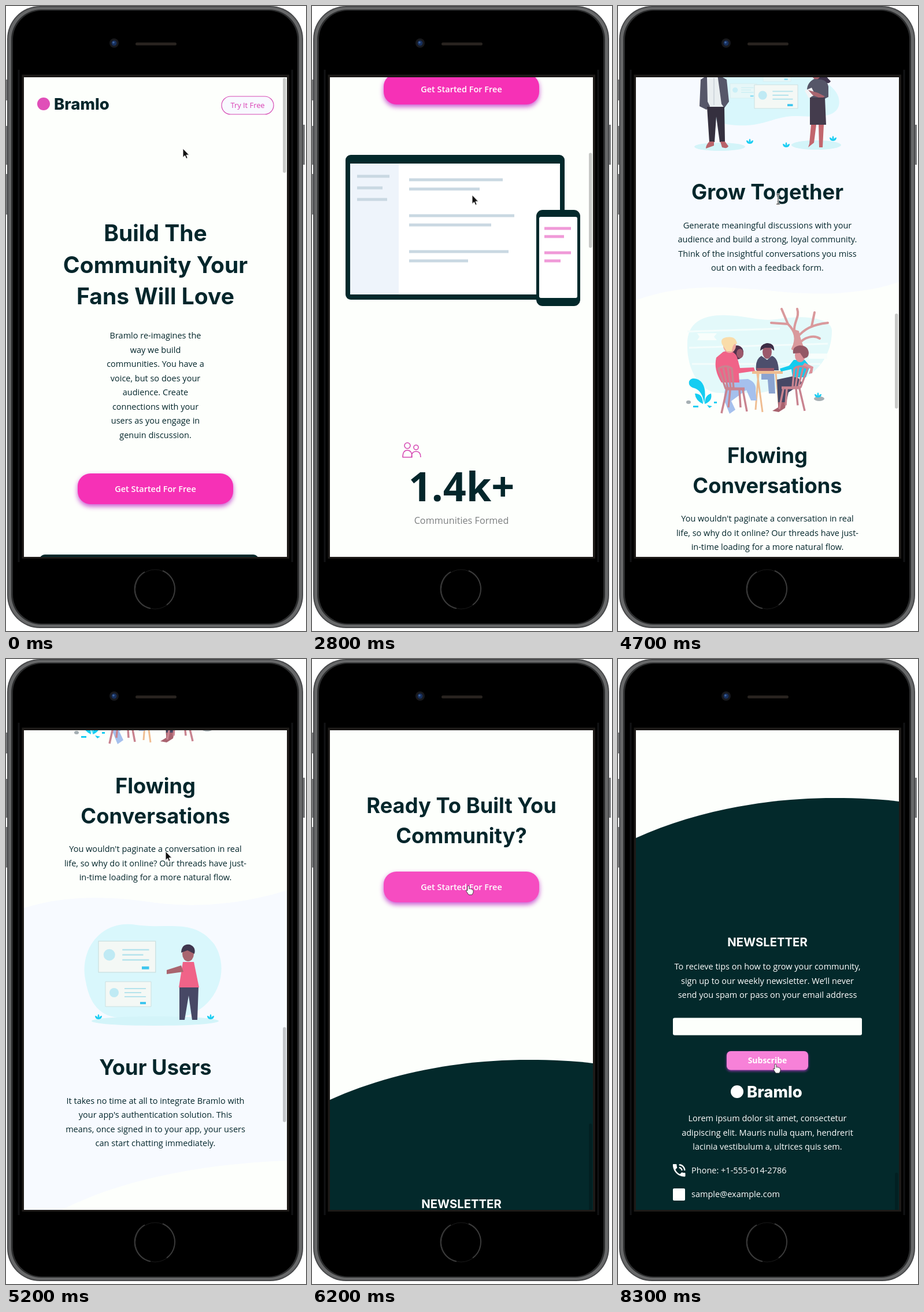
Animation of 519x1079 px, one loop 9100 ms. Source, as an HTML page:

```html
<!DOCTYPE html>
<html lang="en">
<head>
<meta charset="utf-8">
<title>Landing page on a phone</title>
<style>
  @property --scroll { syntax: "<number>"; inherits: true; initial-value: 0; }

  html, body { margin: 0; width: 100%; height: 100%; overflow: hidden; background: #fff; }
  svg { display: block; }
  #stage { animation: scroll 9.1s infinite; }
  #page { transform: translateY(calc(var(--scroll) * -1px)); }
  #thumb { transform: translateY(calc(var(--scroll) * .1876px)); }

  text { fill: #03262b; text-anchor: middle; }
  .brand, .h1, .h2, .h3 { font-family: Inter, sans-serif; font-weight: 700; }
  .brand { font-size: 27.5px; font-weight: 800; text-anchor: start; }
  .h1 { font-size: 39px; }
  .h2 { font-size: 36.3px; }
  .h3 { font-size: 20.3px; }
  .p { font: 14.5px "Open Sans", sans-serif; }
  .stat { font: 700 70px "Open Sans", sans-serif; }
  .label { font: 16.2px "Open Sans", sans-serif; fill: #7c7f80; }
  .btn { font: 600 14.5px "Open Sans", sans-serif; }
  .light text, .btn { fill: #fff; }
  .left { text-anchor: start; }
  .cta { fill: #f631b6; filter: drop-shadow(0 4px 4px rgba(185, 30, 195, .75)); }
  .line { fill: none; stroke: #d64bb4; stroke-width: 1.6; stroke-linejoin: round; }
  .tint { fill: #f7faff; }

  #try { animation: try 9.1s step-end infinite; }
  #start1 { animation: start1 9.1s infinite; }
  #start2 { animation: start2 9.1s infinite; }
  #sub { animation: sub 9.1s infinite; filter: drop-shadow(0 2px 2px rgba(200, 60, 220, .7)); }
  #cursor { animation: point 9.1s step-end infinite; }
  #arrow { animation: arrow 9.1s step-end infinite; }
  #hand { animation: hand 9.1s step-end infinite; }
  #beam { animation: beam 9.1s step-end infinite; }

  /* The screen refreshes ten times a second, hence the stepped segments. */
  @keyframes scroll {
    0% { --scroll: 0; }
    25.274% { --scroll: 0; animation-timing-function: steps(8, start); }
    34.065% { --scroll: 920; }
    37.362% { --scroll: 920; animation-timing-function: steps(5, start); }
    42.857% { --scroll: 1492; animation-timing-function: step-end; }
    43.956% { --scroll: 1495; }
    46.153% { --scroll: 1495; animation-timing-function: steps(6, start); }
    52.747% { --scroll: 2169; animation-timing-function: steps(10, start); }
    63.736% { --scroll: 3283; animation-timing-function: steps(4, start); }
    68.131% { --scroll: 3614; }
    76.923% { --scroll: 3614; animation-timing-function: steps(2, start); }
    79.120% { --scroll: 3911; animation-timing-function: steps(3, start); }
    82.417%, 100% { --scroll: 4066; }
  }
  @keyframes point {
    0% { transform: translate(306px, 246px); }
    3.296% { transform: translate(356px, 222px); }
    4.395% { transform: translate(393px, 202px); }
    6.593% { transform: translate(398px, 182px); }
    7.692% { transform: translate(402px, 174px); }
    10.989% { transform: translate(392px, 230px); }
    12.087% { transform: translate(370px, 400px); }
    13.186% { transform: translate(338px, 600px); }
    14.285% { transform: translate(312px, 740px); }
    15.384% { transform: translate(295px, 828px); }
    16.483% { transform: translate(287px, 835px); }
    18.681% { transform: translate(283px, 760px); }
    19.780% { transform: translate(281px, 540px); }
    20.879% { transform: translate(280px, 366px); }
    21.978% { transform: translate(281px, 335px); }
    23.076% { transform: translate(280px, 309px); }
    25.274% { transform: translate(280px, 309px); animation-timing-function: steps(8, start); }
    34.065% { transform: translate(276px, 332px); }
    63.736% { transform: translate(276px, 332px); animation-timing-function: steps(4, start); }
    68.131% { transform: translate(266px, 391px); }
    74.725% { transform: translate(269px, 394px); }
    76.923% { transform: translate(265px, 430px); }
    78.021% { transform: translate(264px, 453px); }
    79.120% { transform: translate(264px, 453px); animation-timing-function: steps(8, start); }
    87.912% { transform: translate(264px, 652px); animation-timing-function: steps(4, start); }
    92.307%, 100% { transform: translate(268px, 699px); }
  }
  @keyframes hand {
    0% { opacity: 0; } 6.593% { opacity: 1; } 10.989% { opacity: 0; }
    15.384% { opacity: 1; } 18.681% { opacity: 0; }
    68.131% { opacity: 1; } 76.923% { opacity: 0; } 89.010%, 100% { opacity: 1; }
  }
  @keyframes arrow {
    0% { opacity: 1; } 6.593% { opacity: 0; } 10.989% { opacity: 1; }
    15.384% { opacity: 0; } 18.681% { opacity: 1; }
    51.648% { opacity: 0; } 52.747% { opacity: 1; }
    68.131% { opacity: 0; } 76.923% { opacity: 1; } 89.010%, 100% { opacity: 0; }
  }
  @keyframes beam { 0% { opacity: 0; } 51.648% { opacity: 1; } 52.747%, 100% { opacity: 0; } }
  @keyframes try { 0% { opacity: 1; } 6.593% { opacity: .6; } 10.989%, 100% { opacity: 1; } }
  @keyframes start1 {
    0%, 14.285% { fill: #f631b6; animation-timing-function: steps(3, start); }
    17.582% { fill: #f781d8; animation-timing-function: steps(2, start); }
    19.780%, 100% { fill: #f631b6; }
  }
  @keyframes start2 {
    0%, 68.131% { fill: #f631b6; animation-timing-function: steps(3, start); }
    71.428%, 76.923% { fill: #f781d8; animation-timing-function: steps(2, start); }
    79.120%, 100% { fill: #f631b6; }
  }
  @keyframes sub {
    0%, 89.010% { fill: #f631b6; animation-timing-function: steps(3, start); }
    92.307%, 100% { fill: #f781d8; }
  }
</style>
</head>
<body>
<svg id="stage" width="519" height="1079" viewBox="0 0 519 1079">
  <defs>
    <clipPath id="screen"><path d="M31 123H486V951H31Z"/></clipPath>
    <g id="card">
      <path d="M0 0H79V43H0Z" fill="#f4f8f5" stroke="#cbdfe0"/>
      <circle cx="15" cy="19" r="8" fill="#bfeaf4"/>
      <path d="M33 12H70M33 19H62M33 26H70" stroke="#b5e3ec" stroke-width="2"/>
      <path d="M60 35H70V39H60Z" fill="#3fc6ee"/>
    </g>
    <path id="sprig" d="M0 5C-4 5-6 2-6-1C-3-1-2 1-1 2C-2-1-1-3 0-4C1-3 2-1 1 2C2 1 3-1 6-1C6 2 4 5 0 5Z" fill="#1bcdf2"/>
    <g id="chair" fill="none" stroke="#c98490" stroke-width="3.5" stroke-linejoin="round">
      <path d="M2 5Q15-3 25 5L28 39H14ZM10 4L18 39M18 3L23 39"/>
      <path d="M14 40H47" stroke-width="5"/>
      <path d="M16 42L7 82M44 42L51 79M22 42L19 72M38 42L40 72"/>
    </g>
  </defs>

  <!-- Phone body -->
  <path d="M0 127H5V163H0ZM0 207H5V274H0ZM0 290H5V360H0ZM512 205H517V274H512Z" fill="#77787a"/>
  <rect x="2" width="512" height="1074" rx="57" fill="#47484a"/>
  <rect x="4" y="2" width="508" height="1070" rx="55" fill="#676869"/>
  <rect x="9" y="6" width="498" height="1062" rx="52" fill="#2c2d2e"/>
  <rect x="12" y="8" width="492" height="1058" rx="50"/>
  <path d="M22 110V960M495 110V960" stroke="#121315" stroke-width="3"/>
  <circle cx="187" cy="64" r="8" fill="#18191d"/>
  <circle cx="187" cy="64" r="4.5" fill="#172f5c"/>
  <circle cx="186" cy="63" r="1.8" fill="#3f659f"/>
  <rect x="224" y="63" width="71" height="5" rx="2.5" fill="#28231f"/>
  <path d="M29.5 120.5V952H488V120.5Z" fill="none" stroke="#1d1a18" stroke-width="4"/>
  <circle cx="258" cy="1007" r="34" fill="none" stroke="#1a1a1a"/>
  <path d="M271 975A34 34 0 0 1 278 1034M250 1040A34 34 0 0 1 240 977" fill="none" stroke="#3a3a3a" stroke-width="2"/>

  <g clip-path="url(#screen)">
    <path d="M31 123H487V951H31Z" fill="#fdfffc"/>
    <g id="page">
      <!-- Hero -->
      <circle cx="65" cy="169" r="11" fill="#e04fb8"/>
      <text class="brand" x="83" y="179">Bramlo</text>
      <g id="try">
        <rect x="373" y="156" width="90" height="31" rx="15.5" fill="#f8f9ff" stroke="#d64bb4" stroke-width="1.2"/>
        <text x="418" y="176" style="font:12.9px 'Open Sans',sans-serif;fill:#d940b4">Try It Free</text>
      </g>
      <text class="h1" y="406"><tspan x="258.5">Build The</tspan><tspan x="258.5" dy="54.5">Community Your</tspan><tspan x="258.5" dy="54.5">Fans Will Love</tspan></text>
      <text class="p" y="574"><tspan x="258.5">Bramlo re-imagines the</tspan><tspan x="258.5" dy="24.57">way we build</tspan><tspan x="258.5" dy="24.57">communities. You have a</tspan><tspan x="258.5" dy="24.57">voice, but so does your</tspan><tspan x="258.5" dy="24.57">audience. Create</tspan><tspan x="258.5" dy="24.57">connections with your</tspan><tspan x="258.5" dy="24.57">users as you engage in</tspan><tspan x="258.5" dy="24.57">genuin discussion.</tspan></text>
      <rect id="start1" class="cta" x="124" y="807" width="269" height="53" rx="22"/>
      <text class="btn" x="258.5" y="839">Get Started For Free</text>

      <!-- App mockup -->
      <rect x="58" y="947" width="379" height="250" rx="9" fill="#03292b"/>
      <path d="M66 962H429V1188H66Z" fill="#fff"/>
      <path d="M66 962H150V1188H66Z" fill="#eef4fb"/>
      <path d="M78 984H134M78 1004H122M78 1024H130M168 990H330M168 1006H290M168 1052H350M168 1068H310M168 1114H340M168 1130H270" stroke="#c9d8e2" stroke-width="5"/>
      <rect x="388" y="1042" width="76" height="166" rx="11" fill="#03292b"/>
      <rect x="393" y="1054" width="66" height="140" rx="3" fill="#fff"/>
      <path d="M402 1074H448M402 1088H436M402 1116H448M402 1130H430" stroke="#f09ad8" stroke-width="5"/>

      <!-- Figures -->
      <g transform="translate(0 1112)">
        <path class="line" d="M157 357Q157 345 165 345T173 357ZM172 357Q172 347 180 347T188 357"/>
        <circle class="line" cx="165" cy="337" r="5"/><circle class="line" cx="180" cy="340" r="4"/>
        <text class="stat" x="258.5" y="433">1.4k+</text>
        <text class="label" x="258.5" y="472">Communities Formed</text>
      </g>
      <g transform="translate(0 1492)">
        <path class="line" d="M160 331Q174 327 187 330Q190 331 189 337L188 345Q187 349 183 349H170L162 357L163 349Q156 350 156 345L155 336Q155 332 160 331Z"/>
        <g class="line"><circle cx="165.5" cy="339" r="2"/><circle cx="172.5" cy="339" r="2"/><circle cx="179.5" cy="339" r="2"/></g>
        <text class="stat" x="258.5" y="433">2.7m+</text>
        <text class="label" x="258.5" y="472">Messages Sent</text>

        <path class="tint" d="M31 617C110 570 200 549 290 549C370 549 435 565 487 590V1153C440 1175 370 1175 300 1173C220 1160 90 1160 31 1187Z"/>
        <path d="M156 748C158 726 180 719 208 719C245 720 285 725 309 742C335 758 331 783 350 802C372 817 386 829 382 849C376 871 343 868 310 867C270 866 255 886 205 883C166 882 144 862 160 831C175 800 155 779 156 748Z" fill="#d9f7fc"/>
        <ellipse cx="176" cy="920" rx="44" ry="7" fill="#d3f4f9"/>
        <ellipse cx="343" cy="917" rx="43" ry="8" fill="#d3f4f9"/>
        <g opacity=".55">
          <use href="#card" transform="translate(236 737) scale(.61)"/>
          <use href="#card" transform="translate(251 781) scale(.61)"/>
          <use href="#card" transform="translate(194 811) scale(.58)"/>
        </g>
        <use href="#card" x="180" y="754"/>
        <use href="#card" transform="translate(236 813) scale(.95)"/>
        <!-- Standing man -->
        <path d="M153 788L165 784L170 798L160 804Z" fill="#a0616a"/>
        <ellipse cx="161" cy="786" rx="9" ry="11" fill="#a9656f"/>
        <path d="M151 786Q149 775 159 774Q170 774 170 782Q159 783 157 792Z" fill="#342c46"/>
        <path d="M156 798H176L184 853H154Z" fill="#e9eef0"/>
        <path d="M154 797L143 804L141 850L153 856L159 850L155 842ZM172 795L188 804L192 842L184 853L179 846Z" fill="#565769"/>
        <path d="M166 801V848" stroke="#b9c3cc"/>
        <path d="M154 851H184L185 912H176L170 868L167 912H158Z" fill="#35303f"/>
        <path d="M158 911H166V918L152 923Q152 917 158 911ZM177 911H185L191 919Q189 924 180 921Z" fill="#b9636a"/>
        <!-- Standing woman -->
        <path d="M334 795Q336 778 348 780Q356 783 357 793Q360 799 368 807Q365 813 351 809L340 803Z" fill="#40364e"/>
        <ellipse cx="343" cy="795" rx="7" ry="9" fill="#a9656f"/>
        <path d="M334 789Q339 778 350 784L348 794Q340 786 334 789Z" fill="#40364e"/>
        <path d="M339 803L352 804Q362 806 364 816L364 834L356 838H333L335 824L327 825Q326 810 339 803Z" fill="#555668"/>
        <path d="M323 823L335 818L341 830L330 836Z" fill="#f3f4f6"/>
        <path d="M329 822L346 827L358 833L352 837L337 831Z" fill="#a9656f"/>
        <path d="M332 835H358L360 882H332Z" fill="#443c4d"/>
        <path d="M334 882H343L339 913L329 921L331 915ZM347 882H356L354 921H348Z" fill="#c2656d"/>
        <use href="#sprig" x="228" y="910"/><use href="#sprig" x="291" y="916"/><use href="#sprig" x="372" y="905"/>
      </g>

      <!-- Grow and flow -->
      <g transform="translate(0 2169)">
        <path d="M31 508C80 490 130 484 190 486C250 490 310 499 380 496C430 492 460 486 487 476V560H31Z" fill="#fdfffc"/>
        <text class="h2" x="258.5" y="334">Grow Together</text>
        <text class="p" y="383.5"><tspan x="258.5">Generate meaningful discussions with your</tspan><tspan x="258.5" dy="24.57">audience and build a strong, loyal community.</tspan><tspan x="258.5" dy="24.57">Think of the insightful conversations you miss</tspan><tspan x="258.5" dy="24.57">out on with a feedback form.</tspan></text>

        <path d="M120 585C119 548 145 532 188 534C225 535 250 546 280 540C325 533 370 540 370 560C370 588 360 612 340 630C318 650 290 660 245 668H175C140 667 119 625 120 585Z" fill="#e3f9fa"/>
        <path d="M120 562L280 557M123 590L363 583M128 618H350" stroke="#f4fdfc" stroke-width="3"/>
        <path d="M137 565H171L166 571L171 577H137L141 571ZM330 600H362V609H330Z" fill="#f8fefc"/>
        <path d="M302 592C311 574 306 561 294 549L265 547M294 549L283 523M305 563C303 546 315 537 310 523M309 573C322 558 335 550 363 547M335 553L340 529M312 585C322 570 340 568 349 574" fill="none" stroke="#d9999c" stroke-width="4" stroke-linecap="round"/>
        <path d="M300 592Q309 576 304 558L313 561Q316 578 323 592Z" fill="#d9999c"/>
        <!-- People at the table -->
        <ellipse cx="206" cy="598" rx="11" ry="12" fill="#51304c"/>
        <ellipse cx="211" cy="600" rx="6" ry="8" fill="#9b596b"/>
        <ellipse cx="258" cy="597" rx="8" ry="12" fill="#9b596b"/>
        <path d="M246 595Q246 583 259 582Q271 583 270 595L264 590H254Z" fill="#3d2c45"/>
        <path d="M248 604L258 611L266 604Q277 607 278 629H239Q237 610 248 604Z" fill="#4d4e6c"/>
        <path d="M240 625H270V630H240Z" fill="#9b596b"/>
        <path d="M248 632H270L272 669H261L259 645H248Z" fill="#8ba4d0"/>
        <path d="M232 630H285V635H232Z" fill="#efbd91"/>
        <path d="M243 635L238 697M241 635L250 701M273 635L279 693" stroke="#efbd91" stroke-width="3"/>
        <path d="M187 646L225 644Q240 650 238 664L240 681H230L222 663L196 682L203 697L193 704L183 679Z" fill="#a5c0ed"/>
        <path d="M182 597Q200 592 206 606L211 625L235 624L237 630L209 634L210 650H179Q165 628 170 607Z" fill="#f06388"/>
        <ellipse cx="193" cy="586" rx="11" ry="13" fill="#f0aaa0"/>
        <path d="M180 584Q176 574 187 572Q204 569 206 583Q198 582 197 596H188Z" fill="#f9dcaa"/>
        <path d="M275 645L308 638L319 651L295 667L290 689H277Z" fill="#474865"/>
        <path d="M277 684H291L289 694L278 701L267 699L277 693Z" fill="#a9636f"/>
        <path d="M304 611H323L332 622L325 641H302L300 627L282 631L280 626L296 621Z" fill="#12ccef"/>
        <ellipse cx="315" cy="603" rx="9" ry="12" fill="#dc9199"/>
        <path d="M303 600Q301 588 314 586Q329 586 330 599Q330 608 321 608L315 599Z" fill="#935765"/>
        <path d="M323 616L338 623L336 634L330 635L333 626L318 622Z" fill="#dc9199"/>
        <use href="#chair" x="172" y="621"/>
        <use href="#chair" transform="translate(330 621) scale(-1 .95)"/>
        <!-- Plants and stones -->
        <path d="M149 686Q146 665 133 660Q121 657 123 648Q127 640 139 645Q155 654 149 686ZM147 687Q134 681 133 669Q147 669 147 687ZM150 687Q150 672 161 669Q164 682 150 687Z" fill="#15cdf2"/>
        <path d="M130 690H139V693H130ZM154 689L163 691L158 694ZM166 683H171V686H166Z" fill="#15cdf2"/>
        <ellipse cx="348" cy="678" rx="9" ry="4" fill="#a5afb3"/>
        <ellipse cx="122" cy="684" rx="4" ry="3" fill="#a5afb3"/>
        <use href="#sprig" x="346" y="671"/>

        <text class="h2" y="789"><tspan x="258.5">Flowing</tspan><tspan x="258.5" dy="52">Conversations</tspan></text>
        <text class="p" y="890"><tspan x="258.5">You wouldn't paginate a conversation in real</tspan><tspan x="258.5" dy="24.57">life, so why do it online? Our threads have just-</tspan><tspan x="258.5" dy="24.57">in-time loading for a more natural flow.</tspan></text>
      </g>

      <!-- Users and call to action -->
      <g transform="translate(0 3283)">
        <path class="tint" d="M31 -127C110 -152 190 -146 260 -136C350 -125 430 -140 487 -158V309C330 315 155 345 31 433Z"/>
        <path d="M138 0C125 -55 165 -108 225 -98C280 -90 325 -110 360 -65C390 -20 365 50 300 62H210C165 66 145 40 138 0Z" fill="#d9f7fc"/>
        <ellipse cx="258" cy="68" rx="110" ry="8" fill="#d3f4f9"/>
        <use href="#card" transform="translate(160 -70) scale(1.25)"/>
        <use href="#card" x="172"/>
        <ellipse cx="315" cy="-48" rx="10" ry="13" fill="#a9656f"/>
        <path d="M303 -50Q304 -66 318 -64Q329 -60 326 -48L314 -54Z" fill="#40364e"/>
        <path d="M306 -34H325L334 10H299Z" fill="#f06388"/>
        <path d="M303 -28L278 -20V-13L307 -17Z" fill="#a9656f"/>
        <path d="M300 10H333L331 66H322L316 24L309 66H300Z" fill="#474865"/>
        <use href="#sprig" x="160" y="60"/><use href="#sprig" x="354" y="60"/>

        <text class="h2" x="258.5" y="161">Your Users</text>
        <text class="p" y="210.5"><tspan x="258.5">It takes no time at all to integrate Bramlo with</tspan><tspan x="258.5" dy="24.57">your app's authentication solution. This</tspan><tspan x="258.5" dy="24.57">means, once signed in to your app, your users</tspan><tspan x="258.5" dy="24.57">can start chatting immediately.</tspan></text>
        <text class="h2" y="597"><tspan x="258.5">Ready To Built You</tspan><tspan x="258.5" dy="52">Community?</tspan></text>
        <rect id="start2" class="cta" x="124" y="698" width="269" height="53" rx="22"/>
        <text class="btn" x="258.5" y="730">Get Started For Free</text>
      </g>

      <!-- Footer -->
      <g class="light" transform="translate(0 4066)">
        <path d="M31 309C130 264 250 240 375 240C415 240 455 242 487 246V1200H31Z" fill="#03292b"/>
        <text class="h3" x="258.5" y="496">NEWSLETTER</text>
        <text class="p" y="536"><tspan x="258.5">To recieve tips on how to grow your community,</tspan><tspan x="258.5" dy="24.57">sign up to our weekly newsletter. We’ll never</tspan><tspan x="258.5" dy="24.57">send you spam or pass on your email address</tspan></text>
        <rect x="95" y="619.5" width="327" height="30" rx="3" fill="#fdfffc"/>
        <rect id="sub" x="188" y="677" width="141" height="32.5" rx="7"/>
        <text x="258.5" y="698" style="font:700 14px 'Open Sans',sans-serif">Subscribe</text>
        <circle cx="206" cy="747" r="11" fill="#fff"/>
        <text class="brand" x="223" y="757">Bramlo</text>
        <text class="p" y="798"><tspan x="258.5">Lorem ipsum dolor sit amet, consectetur</tspan><tspan x="258.5" dy="24.57">adipiscing elit. Mauris nulla quam, hendrerit</tspan><tspan x="258.5" dy="24.57">lacinia vestibulum a, ultrices quis sem.</tspan></text>
        <path transform="translate(91.3 868.5) scale(1.2)" fill="#fff" d="M20 15.5c-1.25 0-2.45-.2-3.57-.57a1 1 0 0 0-1.02.24l-2.2 2.2a15 15 0 0 1-6.59-6.58l2.2-2.21c.28-.27.36-.66.25-1.01A11 11 0 0 1 8.5 4c0-.55-.45-1-1-1H4c-.55 0-1 .45-1 1 0 9.39 7.61 17 17 17 .55 0 1-.45 1-1v-3.5c0-.55-.45-1-1-1zM19 12h2a9 9 0 0 0-9-9v2c3.87 0 7 3.13 7 7zm-4 0h2c0-2.76-2.24-5-5-5v2c1.66 0 3 1.34 3 3z"/>
        <text class="p left" x="127" y="888">Phone: +1-555-014-2786</text>
        <rect x="95" y="914" width="21" height="21" rx="2" fill="#fff"/>
        <text class="p left" x="127" y="929">sample@example.com</text>
      </g>
    </g>
    <rect id="thumb" x="479" y="124" width="5.5" height="164" rx="2.7" opacity=".21"/>
    <g id="cursor">
      <path id="arrow" d="M0 0V15.5L3.5 12.2L5.8 17.5L8.3 16.4L6 11.2H10.8Z" fill="#111" stroke="#fff"/>
      <path id="hand" d="M3 1Q5-1 6 2V6Q8 5 9 6Q11 6 11 7Q13 7 13 9V12L11 16H5L1 10Q0 7 2 8L3 9Z" fill="#fff" stroke="#222" stroke-width=".8"/>
      <g id="beam" fill="none" transform="translate(1 0)">
        <path d="M-3 -7H3M0 -7V10M-3 10H3" stroke="#fff" stroke-width="3"/>
        <path d="M-3 -7H3M0 -7V10M-3 10H3" stroke="#111"/>
      </g>
    </g>
  </g>
</svg>
</body>
</html>
```
